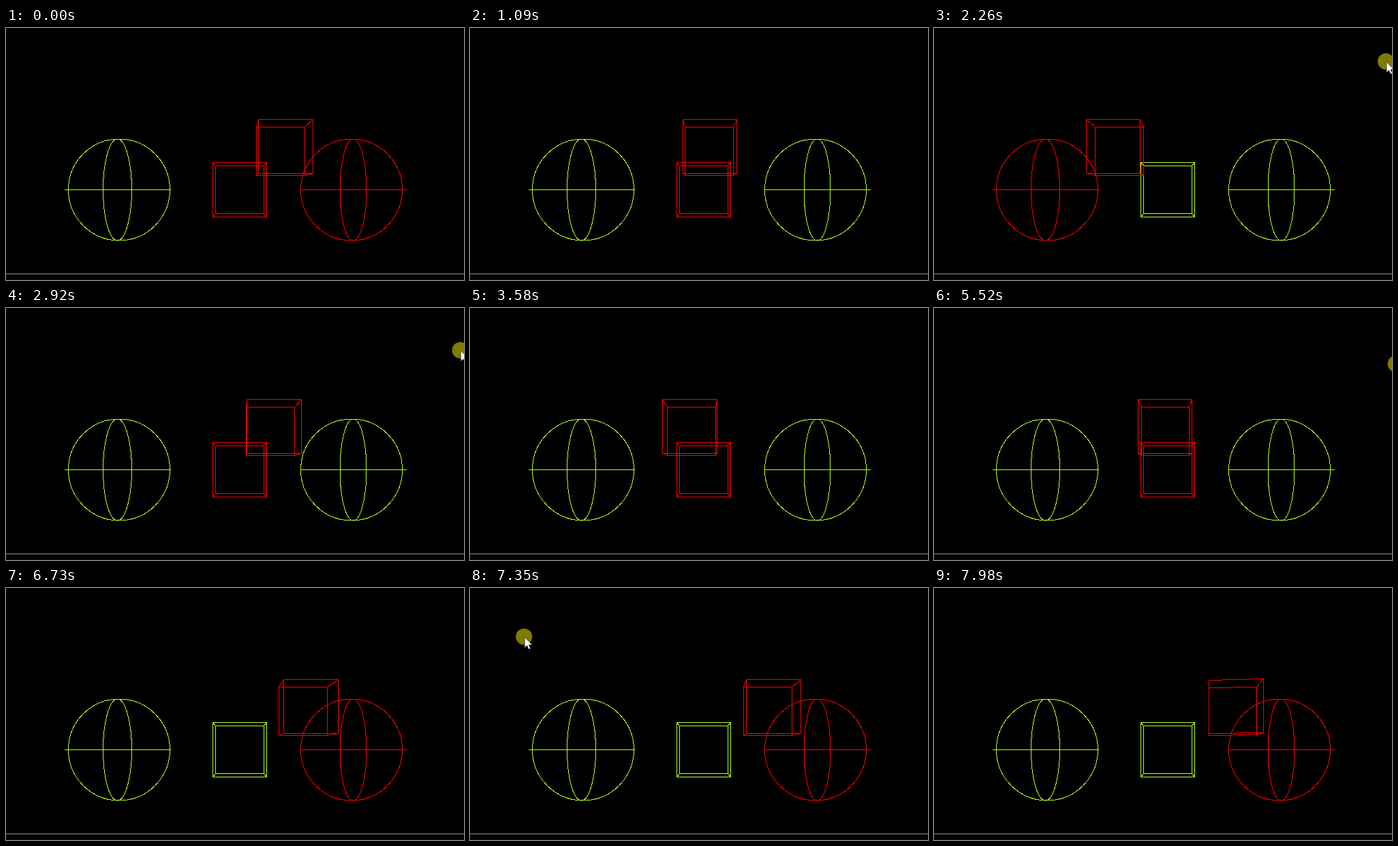
An HTML page that plays this animation: 672x370 px, repeating every 8 s.

```html
<!DOCTYPE html>
<html lang="en">
<head>
<meta charset="utf-8">
<title>Wireframe collisions</title>
<style>
  html, body { margin: 0; width: 100%; height: 100%; overflow: hidden; background: #000; }
  svg { display: block; width: 672px; height: 370px; }
  .wire { fill: none; stroke: #f00; stroke-width: 1; shape-rendering: crispEdges; }
  .wire.free { stroke: #b4ff14; }
</style>
</head>
<body>
<svg viewBox="0 0 672 370">
  <rect width="672" height="370"/>
  <rect y="362" width="672" height="8" fill="#070508"/>
  <rect y="360" width="672" height="2" fill="#505058"/>
  <g transform="translate(.5 .5)">
    <g id="left" class="wire">
      <circle cx="165.5" cy="237" r="74.5"/>
      <ellipse cx="163" cy="237" rx="21" ry="74.5"/>
      <path d="M85 237H241"/>
    </g>
    <g id="right" class="wire">
      <circle cx="506.5" cy="237" r="74.5"/>
      <ellipse cx="509" cy="237" rx="19.5" ry="74.5"/>
      <path d="M431 237H587"/>
    </g>
    <path id="fixed" class="wire"/>
    <path id="mover" class="wire"/>
  </g>
  <g id="cursor">
    <circle r="12" fill="#7f7a00"/>
    <path d="M1 1V16L4.5 13L7 18.5L9.5 17.5L7 12H12Z" fill="#fff" stroke="#222" stroke-width=".6"/>
  </g>
</svg>
<script>
const LOOP = 8000;
const el = id => document.getElementById(id);
const left = el('left'), right = el('right'), fixed = el('fixed'), mover = el('mover'), cursor = el('cursor');
const clamp = v => Math.min(1, Math.max(0, v));

// Turning points of the moving box, [time, left edge], steady speed between them.
const turns = [
  [500, 370.2], [630, 391.3], [1300, 276], [1942, 160], [3096, 388], [3730, 250],
  [4100, 234], [4410, 234], [4911, 144], [6030, 428], [6120, 407.2]
];

function boxX(t) {
  let [t0, x] = turns[0];
  for (const [t1, x1] of turns) {
    if (t > t0 && t1 > t0) x += (x1 - x) * clamp((t - t0) / (t1 - t0));
    t0 = t1;
  }
  return x;
}

// The pointer peeks in at the right edge, then sweeps across once, [time, height].
const peeks = [[2260, 49], [3050, 62], [3930, 62], [4750, 62], [5800, 82]];
const PEEK = 400;

function cursorAt(t) {
  const sweep = clamp((t - 6730) / 1220);
  if (sweep > 0) return [690 - 611 * Math.sin(Math.PI * sweep), 42 + 58 * sweep];
  const near = peeks.find(([at]) => Math.abs(t - at) < PEEK);
  if (!near) return [690, 60];
  const phase = (t - near[0]) / PEEK * Math.PI / 2;
  return [690 - 27 * Math.cos(phase), near[1]];
}

const rect = (x0, y0, x1, y1) => [[x0, y0], [x1, y0], [x1, y1], [x0, y1]];

// Two quads with their matching corners joined, on whole pixels.
function prism(front, back) {
  const point = p => p.map(Math.round).join(' ');
  const quad = q => 'M' + q.map(point).join('L') + 'Z';
  const joins = front.map((p, i) => 'M' + point(p) + 'L' + point(back[i]));
  return quad(front) + quad(back) + joins.join('');
}

function moverPath(x, turn) {
  const s = 236 + 0.891 * (x - 223);
  const front = rect(x - 4 * turn, 134, x + 79.4 - 4 * turn, 213);
  const back = rect(s + 2.4 * turn, 145, s + 70.6 + 2.4 * turn, 216);
  // The left side drops and the right side rises as the box turns.
  for (const quad of [front, back]) {
    quad[0][1] += turn;
    quad[2][1] -= turn;
  }
  front[1][1] -= turn;
  return prism(front, back);
}

function draw(t) {
  const x = boxX(t);
  mover.setAttribute('d', moverPath(x, clamp((t - 6760) / 1200)));
  left.classList.toggle('free', x >= 233.5);
  right.classList.toggle('free', x <= 356);
  fixed.classList.toggle('free', x < 225 || x > 383);
  cursor.setAttribute('transform', `translate(${cursorAt(t).join(' ')})`);
}

fixed.setAttribute('d', prism(rect(303, 197, 382, 277), rect(307, 202, 378, 272)));

const start = performance.now();
function tick() {
  draw((performance.now() - start) % LOOP);
  requestAnimationFrame(tick);
}
tick();
</script>
</body>
</html>
```
